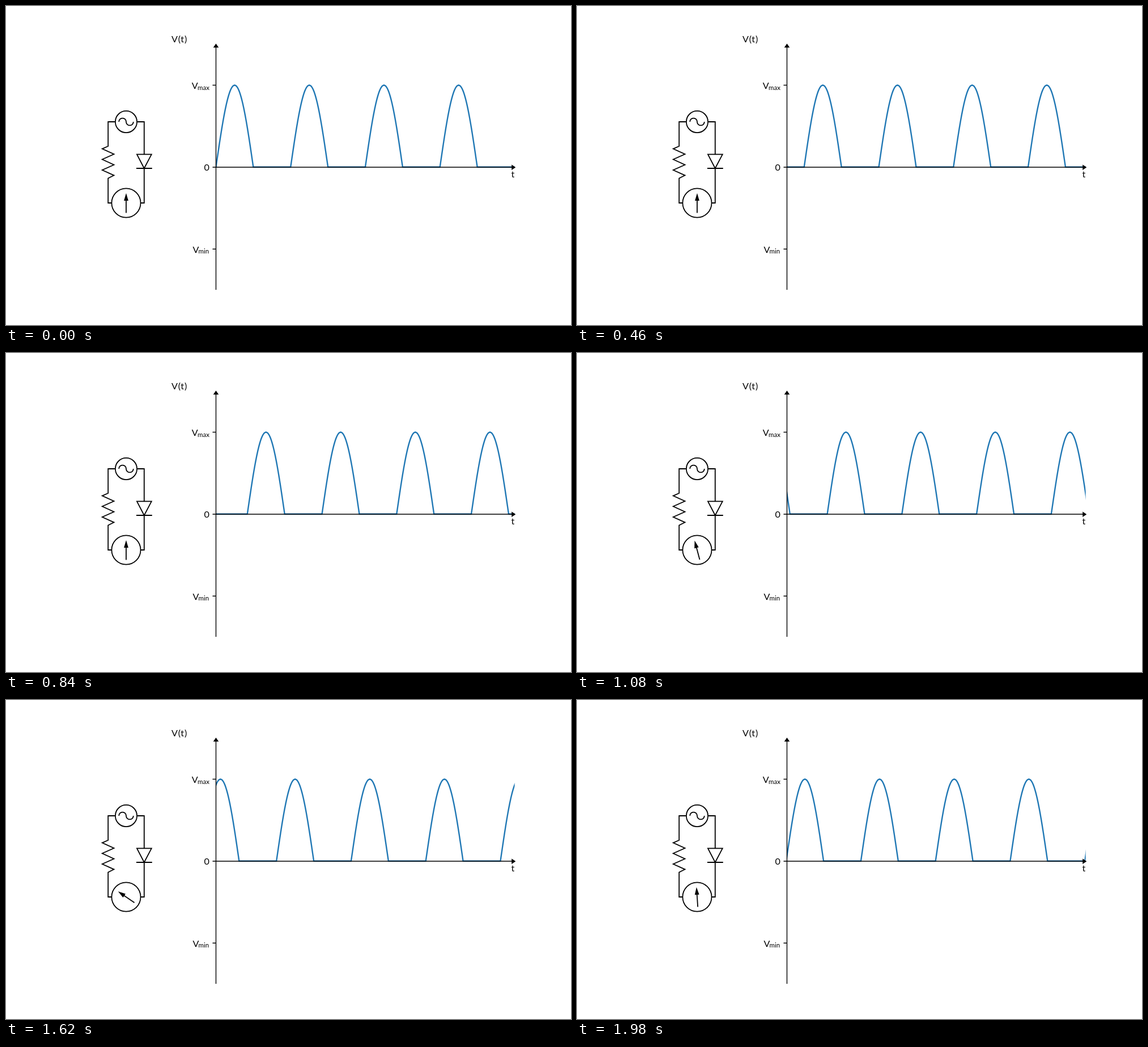
Animation of 997 by 562 pixels, one loop 2 s. Source, as an HTML page:

```html
<!DOCTYPE html>
<html lang="en">
<head>
<meta charset="utf-8">
<title>Half-wave rectifier</title>
<style>
  html, body { margin: 0; width: 100%; height: 100%; overflow: hidden; background: #fff; }
  svg { display: block; width: 997px; height: 562px; }
  text { font: 16.2px Lato, "Open Sans", sans-serif; }
  .sub { font-size: 11.5px; }
  .axis { fill: none; stroke: #000; stroke-width: 1.4; }
  .wire { fill: none; stroke: #000; stroke-width: 1.8; stroke-miterlimit: 10; }
  #wave { fill: none; stroke: #1f77b4; stroke-width: 2.4; stroke-linejoin: round; }
</style>
</head>
<body>
<svg viewBox="0 0 997 562">
  <clipPath id="plot"><rect x="370" y="67" width="527.6" height="433"/></clipPath>

  <g class="wire">
    <path d="M193 204H180.2V247L169.8 251.6L190.5 261L169.8 270.3L190.5 279.7L169.8 289L190.5 298.4L180.2 303.5V347H186.5"/>
    <path d="M231 204H243.8V261.3M243.8 286V347H237.5"/>
    <path d="M231 261.3H256.8L243.8 286ZM230 286H257.8"/>
    <circle cx="212" cy="204" r="19.1"/>
    <path d="M199.2 204a6.4 6.4 0 0 1 12.8 0a6.4 6.4 0 0 0 12.8 0"/>
    <circle cx="212" cy="347" r="25.6"/>
  </g>
  <g id="needle">
    <path class="wire" d="M212 364.6V342"/>
    <path d="M212 329.8L215.9 343H208.1Z"/>
  </g>

  <g clip-path="url(#plot)"><path id="wave"/></g>

  <path class="axis" d="M370.5 500V72M364.5 284H893M364.5 139.5H370.5M364.5 428.3H370.5"/>
  <path d="M370.5 66.3L375.3 73.2H365.7ZM899.3 284.2L892.2 279.4V289Z"/>

  <text x="292" y="64" letter-spacing=".7">V(t)</text>
  <text x="327.8" y="146">V<tspan class="sub" x="338" y="147.6">max</tspan></text>
  <text x="329.5" y="434.6">V<tspan class="sub" x="339.5" y="436.2">min</tspan></text>
  <text x="354.3" y="289.8" text-anchor="middle">0</text>
  <text x="894.3" y="302" text-anchor="middle">t</text>
</svg>
<script>
  const LOOP = 2000, STEP = 20;
  const LEFT = 370.5, ZERO = 283.75, AMP = 144.2, PERIOD = 131.75, CYCLES = 4;
  const SWING = 60;
  const wave = document.getElementById("wave");
  const needle = document.getElementById("needle");

  const volts = cycles => Math.max(0, Math.sin(2 * Math.PI * cycles));

  // One extra cycle on the left scrolls into view.
  const perCycle = 128;
  let path = "";
  for (let i = -perCycle; i <= CYCLES * perCycle; i++) {
    const c = i / perCycle;
    path += (path ? "L" : "M") + (LEFT + c * PERIOD).toFixed(2) + " " + (ZERO - AMP * volts(c)).toFixed(2);
  }
  wave.setAttribute("d", path);

  function draw() {
    const phase = Math.floor((performance.now() % LOOP) / STEP) * STEP / LOOP;
    wave.setAttribute("transform", `translate(${phase * PERIOD} 0)`);
    needle.setAttribute("transform", `rotate(${-SWING * volts(-phase)} 212 347)`);
    requestAnimationFrame(draw);
  }
  draw();
</script>
</body>
</html>
```
